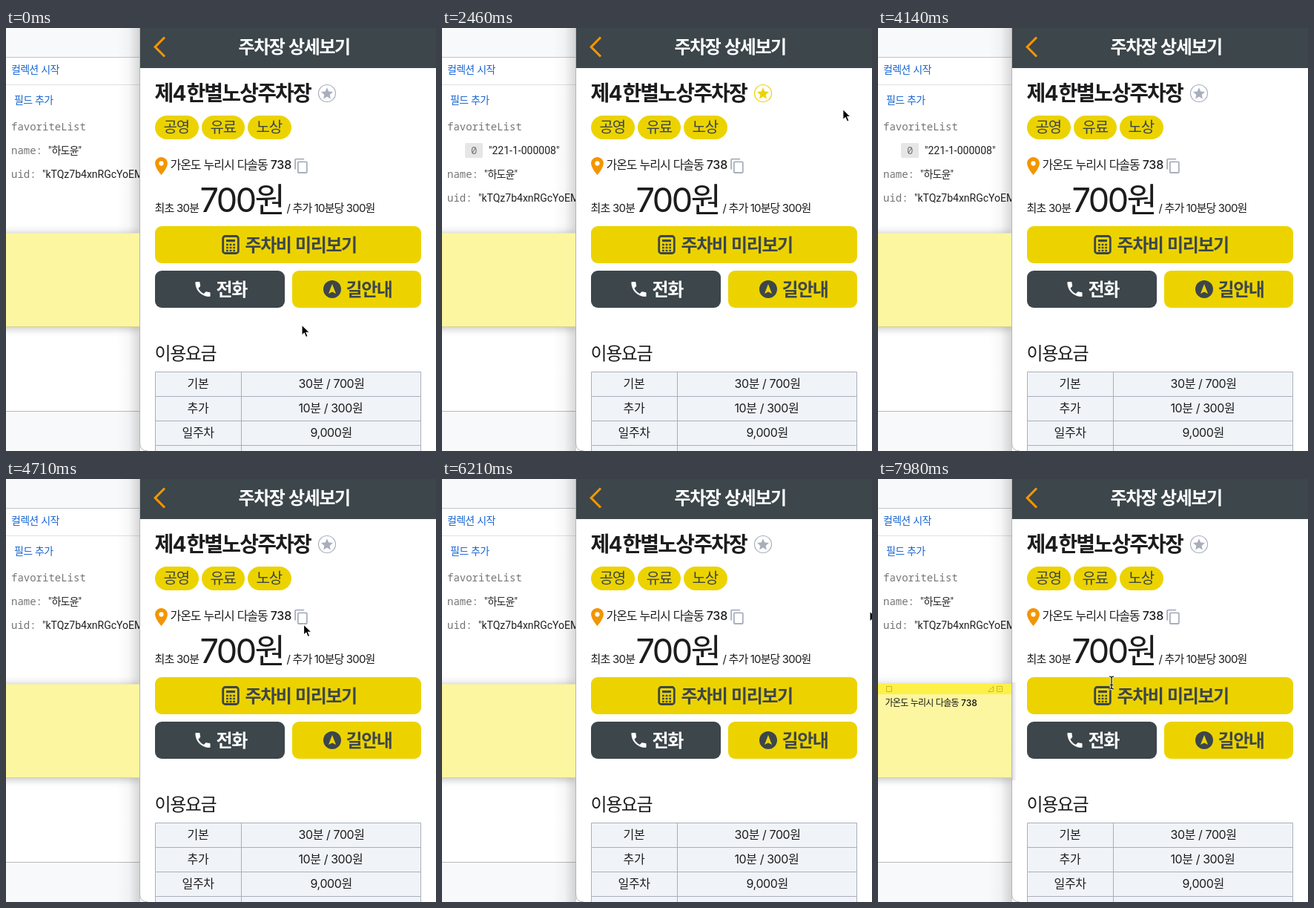
Recreate the animation shown at these times as an HTML page. Size 580 px wide and 570 px high, loop 8 s.

```html
<!DOCTYPE html>
<html lang="ko">
<head>
<meta charset="utf-8">
<style>
html, body { margin: 0; width: 100%; height: 100%; overflow: hidden; background: #fff; }
svg { display: block; width: 580px; height: 570px; }
text { white-space: pre; font-family: Inter, "Noto Sans CJK KR", sans-serif; }
.mono { font-family: "Noto Sans Mono", monospace; }
.rob { font-family: Roboto, "Noto Sans CJK KR", sans-serif; }
.lift { filter: drop-shadow(0 1px 6px rgba(0,0,0,.28)); }
</style>
</head>
<body>
<svg id="stage" viewBox="0 0 580 570" xmlns="http://www.w3.org/2000/svg"></svg>
<script>
const LOOP = 8000;
const DARK = '#3c464b', GOLD = '#ecd300', ORANGE = '#f39500', GRAY = '#a9aebd', INK = '#1c1c1e';
const ADDRESS = '가온도 누리시 다솔동 738';

// Hangul is set a little tighter than Latin text.
function txt(x, y, size, str, { w = 400, fill = INK, cls = '', ls = 0, ko = -.06 } = {}) {
  const body = str.replace(/[가-힣]+/g, s => `<tspan letter-spacing="${(ko * size).toFixed(2)}">${s}</tspan>`);
  return `<text class="${cls}" x="${x}" y="${y}" font-size="${size}" font-weight="${w}" fill="${fill}" letter-spacing="${(ls * size).toFixed(2)}">${body}</text>`;
}
const box = (x, y, w, h, fill, r = 0, more = '') =>
  `<rect x="${x}" y="${y}" width="${w}" height="${h}" rx="${r}" fill="${fill}" ${more}/>`;
const line = (d, stroke, width = 1) => `<path d="${d}" fill="none" stroke="${stroke}" stroke-width="${width}"/>`;
const icon = (x, y, s, d, fill) =>
  `<path transform="translate(${x} ${y}) scale(${s})" d="${d}" fill="${fill}" fill-rule="evenodd"/>`;
const fade = (id, stops) => `<linearGradient id="${id}">`
  + stops.map(([at, a]) => `<stop offset="${at}" stop-opacity="${a}"/>`).join('') + '</linearGradient>';

const PIN = 'M12 2C8.1 2 5 5.1 5 9c0 5.25 7 13 7 13s7-7.75 7-13c0-3.9-3.1-7-7-7zm0 4.4a2.6 2.6 0 1 1 0 5.2a2.6 2.6 0 1 1 0-5.2z';
const COPY = 'M16 1H4c-1.1 0-2 .9-2 2v14h2V3h12V1zm3 4H8c-1.1 0-2 .9-2 2v14c0 1.1.9 2 2 2h11c1.1 0 2-.9 2-2V7c0-1.1-.9-2-2-2zm0 16H8V7h11v14z';
const PHONE = 'M6.62 10.79c1.44 2.83 3.76 5.14 6.59 6.59l2.2-2.2c.27-.27.67-.36 1.02-.24 1.12.37 2.33.57 3.57.57.55 0 1 .45 1 1V20c0 .55-.45 1-1 1-9.39 0-17-7.61-17-17 0-.55.45-1 1-1h3.5c.55 0 1 .45 1 1 0 1.25.2 2.45.57 3.57.11.35.03.74-.25 1.02z';
const STAR = 'M12 17.27L18.18 21l-1.64-7.03L22 9.24l-7.19-.61L12 2 9.19 8.63 2 9.24l5.46 4.73L5.82 21z';

function database() {
  const label = { cls: 'mono', fill: '#757575' }, value = { cls: 'rob', fill: '#212121' };
  const link = { w: 500, fill: '#1a67d2', ko: -.05 };
  return box(0, 0, 181, 40, '#f8f9fa') + line('M0 39.5H181', '#c3c4c6')
    + box(0, 517, 181, 53, '#f8f9fa') + line('M0 516.5H181', '#b9babc')
    + line('M0 76.5H181', '#e0e0e0')
    + txt(7, 60.5, 14, '컬렉션 시작', link) + txt(11, 102, 14, '필드 추가', link)
    + txt(7, 138, 14, 'favoriteList', label)
    + `<g id="item">${box(31, 155, 24, 20, '#e6e6e6', 2)}${txt(39, 170, 14, '0', label)}${txt(63, 170, 14, '"221-1-000008"', value)}</g>`
    + `<g id="fields">${txt(7, 170, 14, 'name:', label)}${txt(57, 170, 14, '"하도윤"', value)}`
    + `${txt(7, 202, 14, 'uid:', label)}${txt(49, 202, 14, '"kTQz7b4xnRGcYoEM', value)}</g>`
    + box(150, 0, 31, 570, 'url(#shade)');
}

function sticky() {
  const mark = (x, d) => line(`M${x} 279.5${d}`, '#c9b92c');
  return `<g class="lift">${box(-20, 276.5, 200.5, 126.5, '#fcf6a0')}</g>`
    + line('M0 402.5H180', '#d9d39a')
    + `<g id="focus">${box(0, 276, 181, 14, '#fdf047')}${mark(11.5, 'h7v7h-7z')}${mark(155.5, 'v7h-7z')}${mark(160.5, 'h7v7h-7zm2 3.5h3')}</g>`
    + box(10, 294, 1.4, 15, '#222', 0, 'id="caret"')
    + `<g id="pasted">${txt(9.5, 305.5, 12, ADDRESS, { w: 500, fill: '#111' })}</g>`;
}

function panel() {
  const chip = (x, w, s) => box(x, 118, w, 32, GOLD, 16) + txt(x + 11.5, 141, 20, s, { w: 500, fill: DARK });
  const row = (i, x1, a, x2, b) => txt(x1, 485 + i * 33, 16, a, { ko: -.02 }) + txt(x2, 485 + i * 33, 16, b, { ls: -.025, ko: -.03 });
  let keys = '';
  for (let i = 0; i < 9; i++) keys += box(297 + i % 3 * 4.6, 290.8 + (i / 3 | 0) * 4, 2.8, 2.4, DARK);
  return '<path d="M181 0H580V570H192Q181 570 181 559Z" fill="#fff"/>'
    + line('M180.5 0V559Q180.5 570 191 570', '#b4b5b7')
    + box(181, 274, 6, 132, 'url(#edge)', 0, 'id="cast"')
    + box(181, 0, 399, 54, DARK)
    + line('M214 12.5L201.2 25.5L214 38.5', ORANGE, 3.2)
    + txt(313.5, 33.5, 24, '주차장 상세보기', { w: 700, fill: '#fff' })
    + txt(200.5, 98, 28, '제4한별노상주차장', { w: 700, ko: -.065 })
    + `<circle id="ring" cx="433" cy="88" r="11.5" fill="#fff" stroke-width="1.2"/><g id="star">${icon(423.4, 78.7, .8, STAR, 'inherit')}</g>`
    + chip(201, 59, '공영') + chip(264, 58, '유료') + chip(326, 59, '노상')
    + icon(195.1, 171.6, 1.2, PIN, ORANGE)
    + txt(221.5, 190, 16, ADDRESS, { w: 500, ls: -.015, ko: -.065 })
    + icon(387.4, 174.8, .92, COPY, GRAY)
    + txt(200.5, 248, 15, '최초 30분', { ls: -.05, ko: -.05 })
    + txt(261.5, 247.5, 45, '700원', { ls: -.055, ko: -.06 })
    + txt(378.5, 248, 15, '/ 추가 10분당 300원', { ls: -.055, ko: -.06 })
    + box(201, 267, 359, 50, GOLD, 9)
    + box(292.7, 280.5, 20.6, 23, 'none', 3, `stroke="${DARK}" stroke-width="2.8"`)
    + box(297, 285, 12, 3.2, DARK) + keys
    + txt(322.5, 301, 24, '주차비 미리보기', { w: 700, fill: DARK })
    + box(201, 327, 175, 50, DARK, 9) + icon(252, 338.6, 1.12, PHONE, '#fff')
    + txt(283.5, 361, 24, '전화', { w: 700, fill: '#fff' })
    + box(386, 327, 174, 50, GOLD, 9)
    + `<circle cx="440" cy="352" r="12" fill="${DARK}"/><path d="M440 345L445 358L440 355.6L435 358Z" fill="${GOLD}"/>`
    + txt(458.5, 361, 24, '길안내', { w: 700, fill: DARK })
    + txt(200.5, 446.5, 24, '이용요금')
    + box(201.5, 463.5, 358, 120, '#f0f4f8')
    + line('M201.5 570V463.5H559.5V570M201.5 496.5H559.5M201.5 529.5H559.5M201.5 562.5H559.5M317.5 463.5V570', GRAY)
    + row(0, 244.5, '기본', 394.5, '30분 / 700원')
    + row(1, 244.5, '추가', 394.5, '10분 / 300원')
    + row(2, 237.5, '일주차', 410.5, '9,000원');
}

const alerts = [
  { open: 1350, close: 2115, text: '즐겨찾기에 추가되었습니다' },
  { open: 3087, close: 3855, text: '즐겨찾기에서 삭제되었습니다' },
  { open: 5115, close: 6015, text: '주소를 클립보드에 복사했습니다' }
];
const alertBox = (a, i) => `<g id="alert${i}"><g class="lift">${box(471, -40, 300, 131.5, '#fff', 3)}</g>`
  + line('M471 -40V91.5H600', 'rgba(0,0,0,.22)', .8) + txt(487, 21.5, 13, a.text, { fill: '#222' }) + '</g>';

const BEAM = 'M-3 -8.5Q0 -8.5 0 -6Q0 -8.5 3 -8.5M0 -6V6M-3 8.5Q0 8.5 0 6Q0 8.5 3 8.5M-2 3H2';
const stage = document.getElementById('stage');
stage.innerHTML = `<defs>${fade('shade', [[0, 0], [.5, .03], [1, .16]])}${fade('edge', [[0, .14], [1, 0]])}</defs>`
  + box(0, 0, 580, 570, '#fff') + database() + sticky() + panel() + alerts.map(alertBox).join('')
  + '<path id="arrow" d="M0 0V14.2L3.3 11.2L5.6 16.6L8.2 15.5L5.9 10.2H10.4Z" fill="#000" stroke="#fff" stroke-width="1.1"/>'
  + `<g id="beam">${line(BEAM, '#fff', 2.8)}${line(BEAM, '#000', 1.2)}</g>`;

// Pointer path: time, x, y
const path = [
  [30, 399, 400], [750, 432, 90], [1350, 432, 90], [1440, 488, 84], [1530, 600, 110],
  [2280, 600, 120], [2730, 432, 90], [2940, 432, 90], [3150, 542, 80], [3240, 605, 110],
  [4200, 605, 150], [4620, 402, 198], [5000, 399, 184], [5400, 399, 184], [5640, 524, 150],
  [6000, 524, 150], [6090, 610, 140], [6150, 610, 170], [6210, 577, 178], [6560, 110, 335],
  [7740, 110, 335], [7970, 315, 274.5]
];
function pointer(t) {
  const i = path.findIndex(p => p[0] > t);
  if (i < 1) return (i < 0 ? path[path.length - 1] : path[0]).slice(1);
  const [t0, x0, y0] = path[i - 1], [t1, x1, y1] = path[i];
  const u = (t - t0) / (t1 - t0), e = u * u * (3 - 2 * u);
  return [x0 + (x1 - x0) * e, y0 + (y1 - y0) * e];
}

const $ = id => document.getElementById(id);
const show = (id, on) => $(id).setAttribute('visibility', on ? 'visible' : 'hidden');
const clamp = v => Math.max(0, Math.min(1, v));

function draw(t) {
  const starred = t >= 2220 && t < 3960, listed = t >= 2460 && t < 4320;
  const tint = starred ? GOLD : GRAY;
  $('ring').setAttribute('stroke', tint);
  $('star').firstChild.setAttribute('fill', tint);
  show('item', listed);
  $('fields').setAttribute('transform', `translate(0 ${listed ? 32 : 0})`);

  alerts.forEach((a, i) => {
    const rest = 1 - clamp((t - a.open) / 120);
    const p = (1 - rest * rest) * (1 - clamp((t - a.close) / 120));
    const g = $('alert' + i);
    show('alert' + i, p > 0);
    g.setAttribute('opacity', p);
    g.setAttribute('transform', `translate(${(1 - p) * 8} ${(p - 1) * 22})`);
  });

  show('focus', t >= 6600);
  show('cast', t >= 6600);
  show('caret', t >= 6600 && t < 7110);
  show('pasted', t >= 7350);

  const [x, y] = pointer(t), typing = t >= 6470;
  show('arrow', !typing);
  show('beam', typing);
  $(typing ? 'beam' : 'arrow').setAttribute('transform', `translate(${x} ${y})`);
}

let start;
function tick(now) {
  if (start === undefined) start = now;
  draw((now - start) % LOOP);
  requestAnimationFrame(tick);
}
draw(0);
requestAnimationFrame(tick);
</script>
</body>
</html>
```
